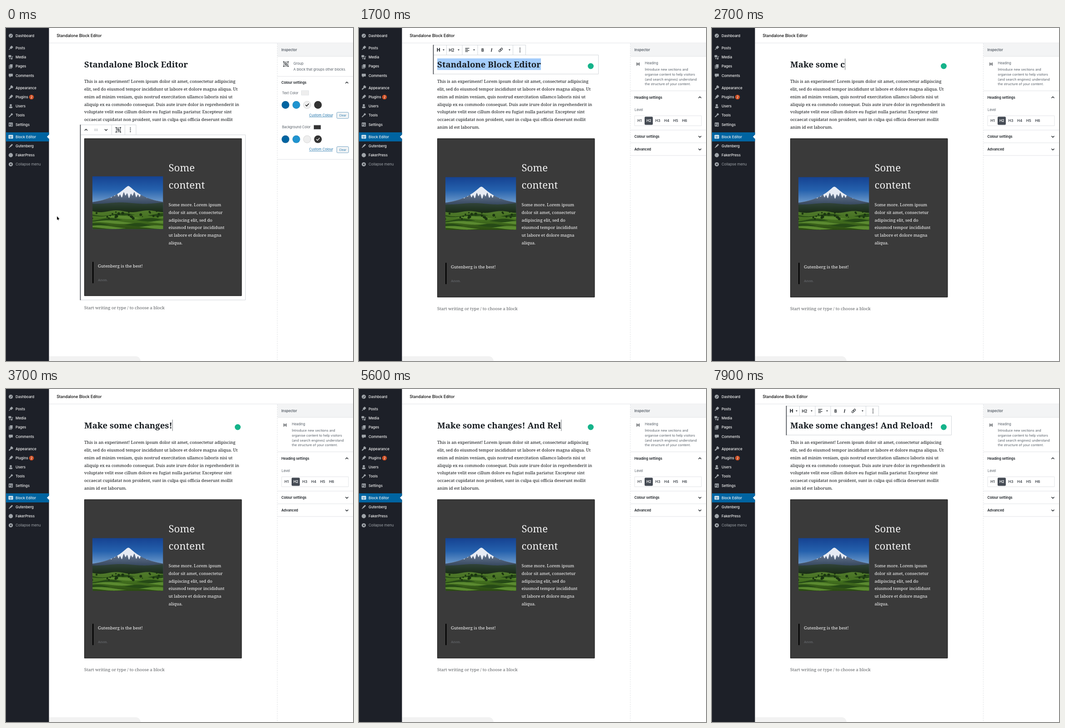
Animation of 763x734 px, one loop 8000 ms. Source, as an HTML page with a canvas:

```html
<!DOCTYPE html>
<html lang="en">
<head>
<meta charset="utf-8">
<title>Standalone Block Editor</title>
<style>
html, body { margin: 0; width: 100%; height: 100%; overflow: hidden; background: #fff; }
canvas { display: block; width: 763px; height: 734px; }
</style>
</head>
<body>
<canvas id="stage"></canvas>
<script>
const W = 763, H = 734, LOOP = 8000;
const cv = document.getElementById('stage'), c = cv.getContext('2d');
const dpr = window.devicePixelRatio || 1;
cv.width = W * dpr;
cv.height = H * dpr;

const SANS = 'Inter, sans-serif', SERIF = '"Noto Serif", serif';
const INK = '#191e23', LINE = '#e2e4e7', GREY = '#555d66', EDGE = '#d3d7db';
const SIDE = '#1d2028', BLUE = '#0064a1', LIGHT = '#eeeeee', DARK = '#343434';

// Layout shared by the page
const LEFT = 172, BODY = 9.43, LEAD = 16.7, PANEL = 597, PAD = 605.5;

function text(s, x, y, size, color = INK, weight = 400, family = SANS) {
  c.font = `${weight} ${size}px ${family}`;
  c.fillStyle = color;
  c.fillText(s, x, y);
}
const serif = (s, x, y, color, size = BODY) => text(s, x, y, size, color, 400, SERIF);
const lines = (list, y, step, draw) => list.forEach((s, i) => draw(s, y + i * step, i));
function rect(x, y, w, h, color) { c.fillStyle = color; c.fillRect(x, y, w, h); }
function frame(x, y, w, h, color, r = 0, lw = 1) {
  c.strokeStyle = color; c.lineWidth = lw;
  c.beginPath(); c.roundRect(x, y, w, h, r); c.stroke();
}
function pill(x, y, w, h, r, color) {
  c.fillStyle = color; c.beginPath(); c.roundRect(x, y, w, h, r); c.fill();
}
function disc(x, y, r, color) {
  c.fillStyle = color; c.beginPath(); c.arc(x, y, r, 0, 7); c.fill();
}
function path(...pts) { c.beginPath(); for (const [x, y] of pts) c.lineTo(x, y); }
function poly(color, ...pts) { path(...pts); c.fillStyle = color; c.fill(); }
function line(color, lw, ...pts) { path(...pts); c.strokeStyle = color; c.lineWidth = lw; c.stroke(); }
function at(x, y, draw, turn = 0) { c.save(); c.translate(x, y); c.rotate(turn); draw(); c.restore(); }
function fade(y0, y1, ...colors) {
  const g = c.createLinearGradient(0, y0, 0, y1);
  colors.forEach((k, i) => g.addColorStop(i / (colors.length - 1), k));
  return g;
}
function chevron(x, y, up) {
  const d = up ? -1.5 : 1.5;
  line(INK, 1.3, [x - 3, y - d], [x, y + d], [x + 3, y - d]);
}

// A slanted tool: a head and a stem on one axis
function tool(k, w, h, stem) {
  at(0, 0, () => { rect(-w / 2, -5, w, h, k); rect(-stem / 2, -5, stem, 10.5, k); }, Math.PI / 4);
}
const icons = {
  dash(k) { disc(0, 0, 4.6, k); line(SIDE, 1, [-2, 2.2], [0, 1.5], [2, -2]); },
  pin(k) { tool(k, 5, 6, 1.3); },
  media(k) { pill(-5, -4.5, 6, 5, 1, k); line(k, 1.2, [3, 3], [3, -1.5], [5, -1.5]); disc(2, 3.4, 1.8, k); disc(-2, 3, 1.3, k); },
  pages(k) { rect(-2, -4.5, 6, 7.5, k); line(k, 1.2, [-3.5, -2.5], [-3.5, 4.3], [2.5, 4.3]); },
  note(k) { pill(-4.5, -4, 9, 6, 1, k); poly(k, [-2.5, 1], [1, 1], [-2.5, 4.5]); },
  brush(k) { tool(k, 6, 4, 2.4); },
  plug(k) { tool(k, 4.5, 7, 1.5); },
  user(k) { disc(0, -2, 2.4, k); pill(-3.8, .8, 7.6, 3.6, 1.8, k); },
  wrench(k) { tool(k, 4, 3.5, 2); },
  sliders(k) { pill(-4.5, -4.5, 9, 9, 1, k); for (const d of [-2, 2]) { rect(d - .4, -3, .8, 6, SIDE); rect(d - 1.3, d / 2, 2.6, 1.4, SIDE); } },
  grid(k) { pill(-5, -4, 10, 8, 1, k); for (const y of [-1.8, 1]) rect(-4, y, 8, .8, BLUE); rect(-.5, -1.5, .8, 5, BLUE); },
  pencil(k) { tool(k, 3, 7, 1.5); },
  dot(k) { disc(0, 0, 4.7, k); },
  fold(k) { disc(0, 0, 4.6, k); poly(SIDE, [-2, 0], [1.3, -2.3], [1.3, 2.3]); }
};
// An empty row opens a gap between groups
const menu = ['Dashboard dash', '', 'Posts pin', 'Media media', 'Pages pages', 'Comments note', '',
  'Appearance brush', 'Plugins plug', 'Users user', 'Tools wrench', 'Settings sliders', '',
  'Block Editor grid', 'Gutenberg pencil', 'FakerPress dot', 'Collapse menu fold'];

function sidebar() {
  rect(0, 0, 94.5, H, SIDE);
  let y = 17;
  for (const row of menu) {
    if (!row) { y += 6.75; continue; }
    const cut = row.lastIndexOf(' '), icon = row.slice(cut + 1);
    const active = icon === 'grid', fold = icon === 'fold';
    if (active) {
      rect(0, 230, 94.5, 20, BLUE);
      poly('#fff', [95, y - 5], [90, y], [95, y + 5]);
    }
    at(10.5, y, () => icons[icon](active ? '#fff' : '#a0a5aa'));
    text(row.slice(0, cut), 21, y + 2.9, 7.9, fold ? '#a0a5aa' : '#f4f4f4', fold ? 400 : 500);
    if (icon === 'plug') {
      disc(56, y + .3, 5.3, '#ca4a1f');
      text('2', 54, y + 2.9, 7, '#fff', 500);
    }
    y += 20.25;
  }
}

function chrome() {
  rect(0, 0, W, H, '#fff');
  text('Standalone Block Editor', 111.5, 20, 8.7, '#000', 500);
  rect(95, 32.5, W - 95, 1, LINE);
  c.setLineDash([3, 2]);
  line(LINE, 1, [PANEL - .5, 34], [PANEL - .5, H]);
  c.setLineDash([]);
  rect(PANEL, 34, 166, 28, '#f3f4f5');
  rule(62);
  text('Inspector', PAD, 50.8, 7.5, GREY, 600);
  pill(95, 723.5, 201, 22, [0, 11, 0, 0], '#f2f2f2');
}
function rule(y) { rect(PANEL, y, 166, 1, LINE); }

// Landscape: layers bounded by curves
const PW = 155.5, PH = 116.5;
const ridge = x => 62 - 44 * Math.exp(-Math.hypot(x - 79, 3) / 38);
const wave = (y, a, f, p) => x => y + a * Math.sin(x * f + p);
function layer(top, bottom, color) {
  c.beginPath();
  for (let x = 0; x <= PW + 1; x++) c.lineTo(x, top(x));
  for (let x = PW + 1; x >= 0; x--) c.lineTo(x, Math.max(top(x), bottom(x)));
  c.fillStyle = color;
  c.fill();
}
function photo(x, y) {
  const floor = () => PH;
  let seed = 7;
  const rnd = () => (seed = seed * 16807 % 2147483647) / 2147483647;
  at(x, y, () => {
    c.beginPath(); c.rect(0, 0, PW, PH); c.clip();
    rect(0, 0, PW, PH, fade(0, 58, '#154291', '#2561ad', '#6f9bcb'));
    layer(ridge, floor, fade(28, 62, '#73849f', '#35465c'));
    layer(ridge, x => 41 + 4 * Math.sin(x * .8) + 3 * Math.sin(x * .33), '#e6ebf4');
    layer(wave(59, 1.5, .06, 1), floor, fade(58, 80, '#304238', '#182b14'));
    layer(wave(77, 2, .09, 0), floor, fade(75, PH, '#517a2c', '#43701f', '#2a4a12'));
    for (let i = 0; i < 3; i++) {
      const b = 84 + i * 11;
      layer(wave(b, 3, .07, i * 2), wave(b + 3, 2, .05, i), '#264a16');
      layer(wave(b + 5, 3, .05, i + 2), wave(b + 8, 2, .06, i + 3), '#5b8a30');
    }
    for (let i = 0; i < 26; i++) disc(rnd() * PW, 76 + rnd() * 18, 1 + rnd() * 2.2, '#1a3411');
  });
}

const para = [
  'This is an experiment! Lorem ipsum dolor sit amet, consectetur adipiscing',
  'elit, sed do eiusmod tempor incididunt ut labore et dolore magna aliqua. Ut',
  'enim ad minim veniam, quis nostrud exercitation ullamco laboris nisi ut',
  'aliquip ex ea commodo consequat. Duis aute irure dolor in reprehenderit in',
  'voluptate velit esse cillum dolore eu fugiat nulla pariatur. Excepteur sint',
  'occaecat cupidatat non proident, sunt in culpa qui officia deserunt mollit',
  'anim id est laborum.'
];
const aside = ['Some more. Lorem ipsum', 'dolor sit amet, consectetur', 'adipiscing elit, sed do',
  'eiusmod tempor incididunt', 'ut labore et dolore magna', 'aliqua.'];

function content(grouped) {
  const drop = grouped ? 0 : 2, tall = grouped ? 347 : 350, inner = 357.5;
  lines(para.slice(0, grouped ? 6 : 7), 121.4, LEAD, (s, y) => serif(s, LEFT, y, '#0c0f12'));
  rect(LEFT, 243.5, 346, tall, '#3a3a3a');
  frame(LEFT + .5, 244, 345.5, tall - 1, '#161616');
  photo(190, 327 + drop * .7);
  lines(['Some', 'content'], 316, 38, (s, y) => serif(s, inner, y, '#f2f2f2', 22.2));
  lines(aside, 393.2, LEAD, (s, y) => serif(s, inner, y, '#fff'));
  rect(190, 515.5 + drop, 2.5, 47, '#000');
  serif('Gutenberg is the best!', 202, 527.5 + drop, '#fff', 9.5);
  serif('Anon.', 202, 558 + drop, '#6c7075', 7.7);
  serif('Start writing or type / to choose a block', LEFT, 619.7 + drop, '#5c5f62', 9.5);
}

// Outline of a selected block with its toolbar on top
function blockTools(y, w, h, bars) {
  const x = 163;
  rect(x, y, w, 22, '#fff');
  frame(x + .5, y + .5, w - 1, 22, EDGE);
  for (const b of bars) rect(x + b, y, 1, 22, EDGE);
  frame(x + .5, y + 22.5, 363, h, EDGE);
  rect(x - .3, y, 1.6, h + 23, '#42484e');
  for (const d of [-4, 0, 4]) disc(x + w - 13, y + 11.5 + d, 1.1, INK);
}
function groupIcon(x, y) {
  frame(x - 4.5, y - 4.5, 9, 9, INK, 0, .8);
  for (const a of [-5, 5]) for (const b of [-5, 5]) rect(x + a - 1, y + b - 1, 2, 2, INK);
  for (const d of [-2.5, -.6]) frame(x + d, y + d, 3.2, 3.2, INK, 0, .8);
}

function groupTools() {
  const y = 224.5;
  blockTools(213, 123.5, 364, [69, 98]);
  chevron(176, y, true);
  for (let i = 0; i < 6; i++) rect(194.5 + i % 3 * 2.8, y - 2 + (i > 2) * 2.8, 1.4, 1.4, '#8a9096');
  chevron(220, y);
  groupIcon(247, y);
}

function headingTools() {
  const y = 48.3;
  blockTools(37, 204, 42, [29, 63.5, 97.5, 175]);
  text('H', 171, 52, 10, INK, 800);
  text('H2', 197.5, 51.5, 8.6, INK, 600);
  for (const x of [186, 219, 253, 331]) poly(INK, [x - 2, y - 1], [x + 2, y - 1], [x, y + 1.5]);
  for (let i = 0; i < 4; i++) rect(233.5, 44 + i * 2.5, i % 2 ? 6 : 9, 1.1, INK);
  text('B', 269, 51.6, 8.7, INK, 700);
  text('I', 289.5, 51.8, 10, INK, 'italic 700', '"Liberation Serif", serif');
  at(311.5, y, () => {
    for (const x of [-5, 0]) frame(x, -1.8, 5, 3.6, INK, 1.8, 1.1);
  }, -Math.PI / 4);
}

function swatches(y, label, sample, sx, picked) {
  text(label, 607, y + 2.6, 7.4, GREY);
  rect(sx, y - 4.5, 15, 9, sample);
  frame(sx - .5, y - 5, 16, 10, EDGE, 0, .7);
  [BLUE, '#2094d0', LIGHT, DARK].forEach((k, i) => {
    const x = 614.5 + i * 23.8, cy = y + 26.5;
    disc(x, cy, 8.4, k);
    frame(x - 8.2, cy - 8.2, 16.4, 16.4, 'rgba(0,0,0,.18)', 8.2, .6);
    if (i === picked) line(k === LIGHT ? '#000' : '#fff', 1.3, [x - 3.5, cy], [x - 1, cy + 2.5], [x + 3.7, cy - 2.8]);
  });
  text('Custom Colour', 666.5, y + 51.5, 7.5, '#1a70a8');
  rect(666.5, y + 52.8, 51.5, .7, '#1a70a8');
  pill(727, y + 42.5, 26.5, 14, 2, '#f3f5f6');
  frame(727.3, y + 42.8, 26, 13.5, '#5590b9', 2, .8);
  text('Clear', 732.5, y + 51.8, 6.3, '#2878ad');
}
function section(s, y, open) {
  text(s, PAD, y + 2.7, 7.5, INK, 600);
  chevron(749.5, y, open);
}

function groupPanel() {
  groupIcon(615.5, 79.5);
  text('Group', 632, 80.5, 7.6, GREY);
  text('A block that groups other blocks.', 632, 94, 7.4, GREY);
  rule(106);
  section('Colour settings', 120.5, true);
  swatches(143, 'Text Color', LIGHT, 650, 2);
  swatches(218.7, 'Background Color', DARK, 677, 3);
  rule(289);
}

const about = ['Introduce new sections and', 'organise content to help visitors',
  '(and search engines) understand', 'the structure of your content.'];
function headingPanel() {
  text('H', 610, 83.3, 9.5, '#32373c', 700);
  text('Heading', 628.5, 80.3, 7.4, GREY);
  lines(about, 94.2, 10.7, (s, y) => text(s, 628.5, y, 7.3, GREY));
  rule(138);
  section('Heading settings', 153, true);
  text('Level', 606, 182.5, 7.4, GREY);
  frame(606, 193.5, 147, 22, LINE);
  pill(628, 195.5, 18, 18, 2, '#454b54');
  for (let i = 0; i < 6; i++) text('H' + (i + 1), 612.3 + i * 19.6, 207.4, 8, i === 1 ? '#fff' : '#40464d', 600);
  for (let i = 0; i < 3; i++) rule(224.5 + i * 28);
  lines(['Colour settings', 'Advanced'], 239.5, 28, (s, y) => section(s, y));
}

const CLICK = 750, SELECT = 1250, TYPE = 1790, POINT = 6480, WAKE = 6650;
// Typing runs: start, ms per key, text
const runs = [[TYPE, 90, 'Make some changes!'], [4610, 140, ' And Reload!']];

function typed(t) {
  let s = '', last = CLICK;
  for (const [t0, step, str] of runs) {
    const n = Math.min(str.length, Math.floor((t - t0) / step) + 1);
    if (n > 0) { s += str.slice(0, n); last = t0 + (n - 1) * step; }
  }
  return { s, last };
}

function title(t) {
  const { s, last } = typed(t);
  const typing = t >= TYPE, selected = t >= SELECT && !typing;
  const str = typing ? s : 'Standalone Block Editor';
  c.font = `700 18.66px ${SERIF}`;
  if (selected) rect(LEFT, 67, c.measureText(str).width, 25.5, '#a5cdfb');
  c.fillStyle = INK;
  c.fillText(str, LEFT, 86.8);
  if (t >= CLICK && !selected && (t - last) % 1000 < 500) {
    rect(LEFT + c.measureText(typing ? str : 'Stan').width, 67.5, 1, 25, '#70757a');
  }
}

function arrow(x, y) {
  at(x, y, () => {
    line('#fff', 1.4, [0, 8], [0, 0], [5.5, 5.5]);
    line('#111', 1.5, [1.5, 4], [3.6, 8.5]);
    poly('#111', [0, 0], [0, 7.6], [5.5, 5.4]);
  });
}
function beam(x, y) {
  for (const d of [-5, 5]) line('#555', .9, [x - 2, y + d], [x, y + d * .8], [x + 2, y + d]);
  rect(x - .4, y - 4, .8, 8, '#555');
}

const ease = (t, t0, t1) => {
  const p = Math.min(1, Math.max(0, (t - t0) / (t1 - t0)));
  return p * p * (3 - 2 * p);
};
function pointer(t) {
  if (t >= 1600 && t < POINT) return;
  const come = ease(t, 100, 700), nudge = ease(t, POINT, 6600), go = ease(t, 7150, 7650);
  const x = 112 + 106 * come + 11 * nudge - 129 * go;
  const y = 415 - 335 * come - 94 * go;
  const overText = x > LEFT && x < 518 && y > 66 && y < 226;
  (overText ? beam : arrow)(x, y);
}

function draw(t) {
  c.setTransform(dpr, 0, 0, dpr, 0, 0);
  const grouped = t < CLICK;
  chrome();
  content(grouped);
  if (grouped) { groupTools(); groupPanel(); } else headingPanel();
  if (!grouped && (t < TYPE || t >= WAKE)) headingTools();
  title(t);
  if (t >= 1450) disc(509.5, 84, 6.5, '#15b38a');
  sidebar();
  pointer(t);
}

const start = performance.now();
function tick() {
  draw((performance.now() - start) % LOOP);
  requestAnimationFrame(tick);
}
tick();
</script>
</body>
</html>
```
